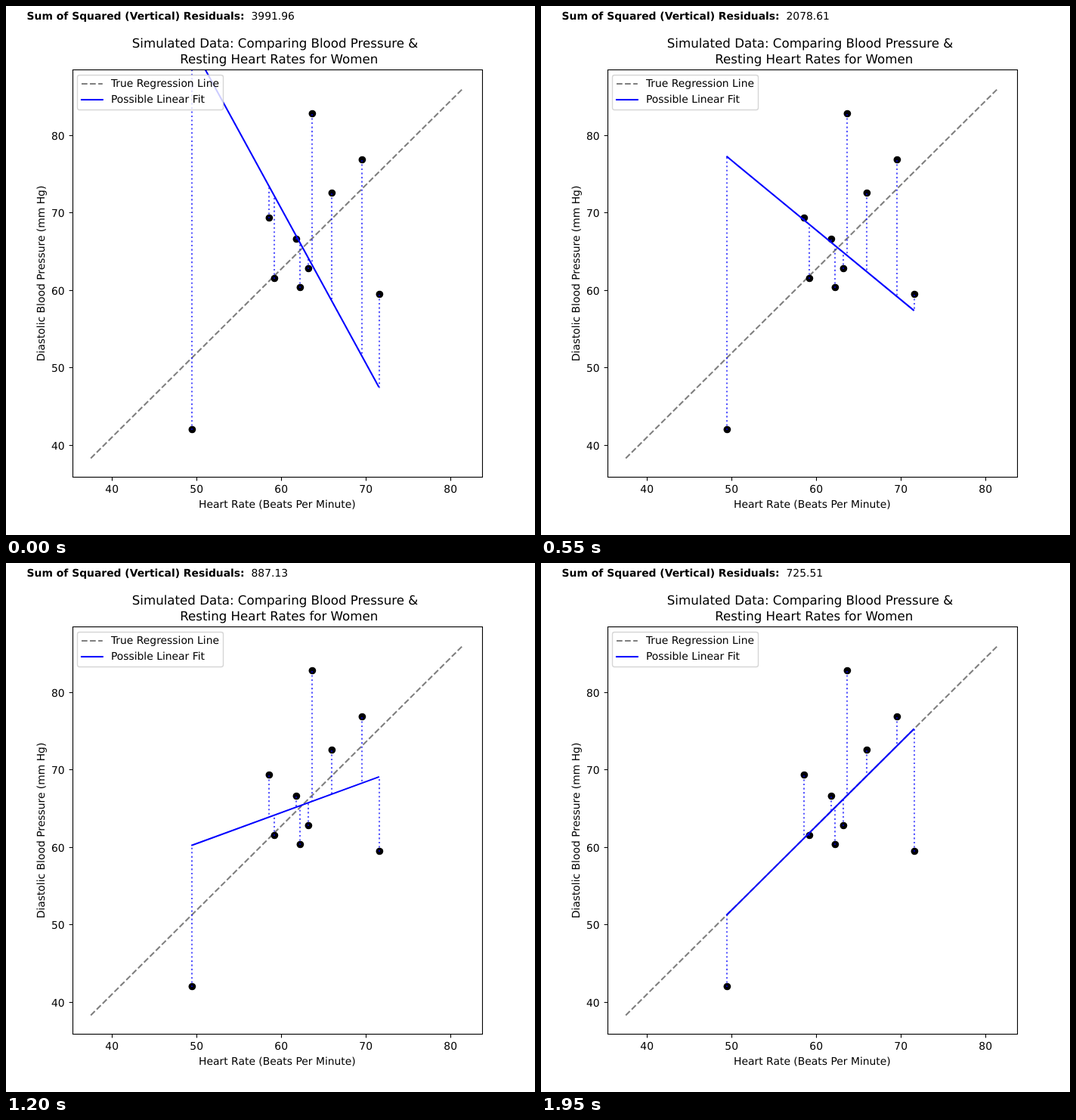
Animation of 700 by 700 pixels, one loop 3 s. Source, as an HTML page:

```html
<!DOCTYPE html>
<html lang="en">
<head>
<meta charset="utf-8">
<title>Comparing linear fits</title>
<style>
  html, body { margin: 0; width: 100%; height: 100%; overflow: hidden; background: #fff; }
  svg { display: block; width: 700px; height: 700px; }
  text { font: 13.89px "DejaVu Sans", sans-serif; text-rendering: geometricPrecision; white-space: pre; }
  .title { font-size: 16.67px; }
  .bold { font-weight: bold; }
  .mid { text-anchor: middle; }
  .end { text-anchor: end; }
  .axis { fill: none; stroke: #000; stroke-width: 1.11; }
  .line { fill: none; stroke-width: 2.083; }
  .true { stroke: #000; stroke-opacity: .5; stroke-dasharray: 7.71 3.33; }
  .fit { stroke: #00f; stroke-linecap: square; }
  .residual { stroke: #00f; stroke-opacity: .65; stroke-dasharray: 2.083 3.437; }
</style>
</head>
<body>
<svg viewBox="0 0 700 700">
  <clipPath id="plot"><rect x="88" y="84" width="542.5" height="539.5"/></clipPath>

  <text class="bold" x="27.6" y="18">Sum of Squared (Vertical) Residuals:</text>
  <text id="total" x="324.5" y="18"></text>
  <text class="title mid" x="356" y="55">Simulated Data: Comparing Blood Pressure &amp;</text>
  <text class="title mid" x="361.3" y="76">Resting Heart Rates for Women</text>
  <text class="mid" x="358.9" y="664">Heart Rate (Beats Per Minute)</text>
  <text class="mid" transform="translate(51 354) rotate(-90)">Diastolic Blood Pressure (mm Hg)</text>

  <g clip-path="url(#plot)">
    <g id="points"></g>
    <path class="line true" d="M112.16 598.5L605.34 108.5"/>
    <path class="line fit" id="fit"/>
    <g id="residuals"></g>
  </g>

  <g id="ticks"></g>
  <rect class="axis" x="88.5" y="84.5" width="542" height="539"/>

  <rect x="94.5" y="91.5" width="193" height="46" rx="2.8" fill="#fff" fill-opacity=".8"
        stroke="#ccc" stroke-opacity=".8" stroke-width="1.39"/>
  <path class="line true" d="M100 103H127.8"/>
  <path class="line fit" d="M100 124H127.8"/>
  <text x="138.9" y="107">True Regression Line</text>
  <text x="138.9" y="128">Possible Linear Fit</text>
</svg>
<script>
  const byId = id => document.getElementById(id);

  function add(parent, tag, attrs, text = "") {
    const el = document.createElementNS("http://www.w3.org/2000/svg", tag);
    for (const key in attrs) el.setAttribute(key, attrs[key]);
    el.textContent = text;
    return byId(parent).appendChild(el);
  }

  const points = [
    [246, 560.5], [348, 280.5], [355, 360.5], [384, 308.5], [389, 372.5],
    [400, 347.5], [405, 142.5], [431, 247.5], [471, 203.5], [494, 381.5]
  ];
  const mean = { x: 392.6, y: 319.9 };
  const aspect = 0.9144;        // pixel slope per unit of data slope
  const bestSlope = 1.08655;
  const leastSum = 725.5145;
  const spread = 342.869;       // sum of squared x deviations
  const stepTime = 50, lastStep = 39, loopTime = 3000;

  for (let i = 0; i < 5; i++) {
    const x = 140.5 + 112 * i, y = Math.floor(581.4 - 102.5 * i) + 0.5;
    add("ticks", "path", { class: "axis", d: `M${x} 623.5v4.86` });
    add("ticks", "text", { class: "mid", x: x - 0.3, y: 644 }, 40 + 10 * i);
    if (i < 5) {
      add("ticks", "path", { class: "axis", d: `M88.5 ${y}h-4.86` });
      add("ticks", "text", { class: "end", x: 77.6, y: y + 5 }, 40 + 10 * i);
    }
  }

  const residuals = points.map(([x, y]) => {
    add("points", "circle", { cx: x + 0.4, cy: y, r: 4.86 });
    return add("residuals", "path", { class: "line residual" });
  });

  let shown = -1;

  function draw(step) {
    const slope = step < lastStep ? -2 + step / 10 : bestSlope;
    const fitAt = x => mean.y - slope * aspect * (x - mean.x);
    const sum = leastSum + spread * (slope - bestSlope) ** 2;
    byId("total").textContent = sum.toFixed(2);
    byId("fit").setAttribute("d", `M246.2 ${fitAt(246.2)}L492.9 ${fitAt(492.9)}`);
    points.forEach(([x, y], i) =>
      residuals[i].setAttribute("d", `M${x} ${Math.round(y)}V${Math.round(fitAt(x + 0.2))}`));
  }

  function tick() {
    const step = Math.min(lastStep, Math.floor(performance.now() % loopTime / stepTime));
    if (step !== shown) draw(shown = step);
    requestAnimationFrame(tick);
  }
  tick();
</script>
</body>
</html>
```
